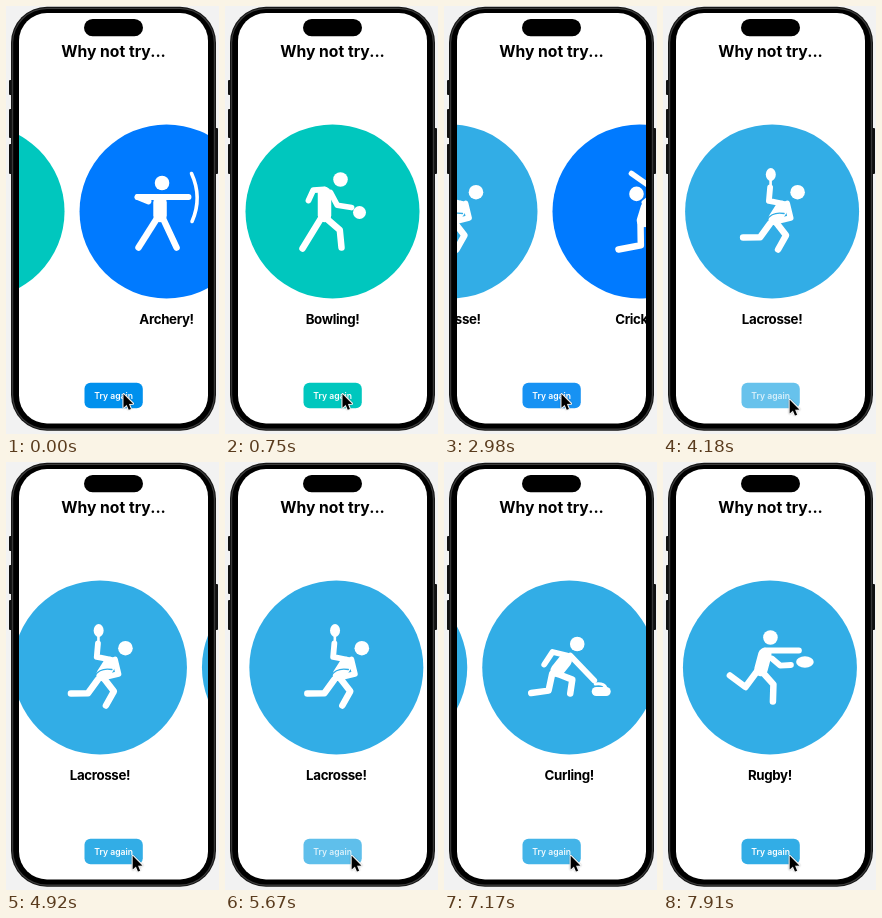
Animation of 213x428 px, one loop 8000 ms. Source, as an HTML page with a canvas:

```html
<!DOCTYPE html>
<html lang="en">
<head>
<meta charset="utf-8">
<title>Why not try...</title>
<style>
html, body { margin: 0; width: 100%; height: 100%; overflow: hidden; background: #f2f2f2; }
canvas { display: block; width: 100vw; height: 100vh; }
</style>
</head>
<body>
<canvas id="stage"></canvas>
<script>
const W = 213, H = 428, LOOP = 8000, TICK = 149.25, SLIDE = 1000;
const LEFT = 13, RIGHT = 202, SPAN = RIGHT - LEFT, MID = (LEFT + RIGHT) / 2;
const FONT = 'Inter, "Liberation Sans", sans-serif';
const BLUE = [0, 122, 255], MINT = [0, 199, 190], CYAN = [50, 173, 230];
const canvas = document.getElementById('stage');
const ctx = canvas.getContext('2d');

const rgb = c => `rgb(${c.map(Math.round).join(',')})`;
const mix = (a, b, k) => a.map((v, i) => v + (b[i] - v) * k);
const clamp = x => Math.min(1, Math.max(0, x));

// Ease in-out: cubic-bezier(.42, 0, .58, 1)
function ease(x) {
  if (x <= 0) return 0;
  if (x >= 1) return 1;
  let lo = 0, hi = 1, s = 0.5;
  for (let i = 0; i < 24; i++) {
    const u = 1 - s;
    if (1.26 * s * u * u + 1.74 * s * s * u + s * s * s < x) lo = s; else hi = s;
    s = (lo + hi) / 2;
  }
  return s * s * (3 - 2 * s);
}

function line(width, ...points) {
  ctx.lineWidth = width;
  ctx.beginPath();
  points.forEach(p => ctx.lineTo(...p));
  ctx.stroke();
}

// Two equal bones; bend pushes the joint sideways by a share of the reach.
function limb(width, [x0, y0], [x1, y1], bend = 0) {
  const joint = [(x0 + x1) / 2 - bend * (y1 - y0), (y0 + y1) / 2 + bend * (x1 - x0)];
  line(width, [x0, y0], joint, [x1, y1]);
}

function arc(width, [x0, y0], [cx, cy], [x1, y1]) {
  ctx.lineWidth = width;
  ctx.beginPath();
  ctx.moveTo(x0, y0);
  ctx.quadraticCurveTo(cx, cy, x1, y1);
  ctx.stroke();
}

function oval(x, y, rx, ry = rx) {
  ctx.beginPath();
  ctx.ellipse(x, y, rx, ry, 0, 0, 7);
  ctx.fill();
}

function box(x, y, w, h, r, fill) {
  ctx.beginPath();
  ctx.roundRect(x, y, w, h, r);
  ctx.fillStyle = fill;
  ctx.fill();
}

function text(str, x, y, size, weight, spacing, fill) {
  ctx.font = `${weight} ${size}px ${FONT}`;
  ctx.letterSpacing = spacing + 'px';
  ctx.textAlign = 'center';
  ctx.fillStyle = fill;
  ctx.fillText(str, x, y);
}

// Key points around the disc centre: [start, end, bend] per limb.
const sports = {
  Archery: {
    head: [-4.5, -28.5], torso: [[-6.5, -9], [-6.5, 4]],
    arms: [[[-29, -14.5], [22, -14.5]], [[-29, -14.5], [-18, -10]]],
    legs: [[[-9, 6], [-28, 36]], [[-4, 6], [10, 36]]],
    gear() { arc(3.6, [25, -38], [36, -14], [25.5, 10]); }
  },
  Bowling: {
    head: [8, -32], torso: [[-8, -18], [-8, 4]],
    arms: [[[-8, -22], [-24, -11], 0.3], [[-2, -19], [19, -4], 0.25]],
    legs: [[[-11, 6], [-30, 37]], [[-6, 7], [9, 36], -0.2]],
    gear() { oval(27, 1, 6.5); }
  },
  Cricket: {
    head: [-3, -17.6], torso: [[8, -4], [4, 9]],
    arms: [[[6, -5], [14, -23], 0.6], [[5, -9], [20, -20]]],
    legs: [[[1, 11], [-21, 38], -0.42], [[4, 11], [19, 38], -0.38]],
    gear() { line(5.6, [-8, -38], [12, -24]); }
  },
  Lacrosse: {
    head: [25.5, -19.3], torso: [[10, -4], [3, 7]],
    arms: [[[-2, -24], [10, -8], 0.45], [[15, -8], [4, 10], -0.5]],
    legs: [[[-2, 12], [-29, 26], -0.25], [[4, 11], [6, 38], -0.33]],
    gear(back) {
      oval(-1.3, -37, 5, 6.5);
      line(2.6, [-1.5, -32], [-1.5, -20]);
      ctx.strokeStyle = back;
      arc(1.3, [-5, 8], [0, 0], [12, 2]);
    }
  },
  Curling: {
    head: [8, -23.5], torso: [[-4, -7], [-12, 3]],
    arms: [[[1, -12], [25, 13]], [[-2, -12], [-25, -3], 0.35]],
    legs: [[[-10, 7], [1, 26], -0.4], [[-17, 6], [-38, 25.5], -0.35]],
    gear() {
      arc(3, [26, 16.5], [36, 15], [37, 22]);
      line(9, [27, 24], [37, 24]);
    }
  },
  Rugby: {
    head: [0.5, -30], torso: [[-5, -13], [-9, 2]],
    arms: [[[-5, -17], [29, -17]], [[2, -9], [21, -2.5], 0.2]],
    legs: [[[-13, 4], [-40, 8], -0.5], [[-8, 4], [3, 34], -0.2]],
    gear() { oval(35, -5.5, 8.8, 5.8); }
  }
};

const steps = [
  { at: -2000, name: 'Archery', color: BLUE },
  { at: -367, name: 'Bowling', color: MINT },
  { at: 1256, name: 'Cricket', color: BLUE },
  { at: 2505, name: 'Lacrosse', color: CYAN },
  { at: 4113, name: 'Lacrosse', color: CYAN },
  { at: 5570, name: 'Curling', color: CYAN },
  { at: 6950, name: 'Rugby', color: CYAN }
];

function athlete({ head, torso, arms, legs, gear }, back) {
  ctx.fillStyle = ctx.strokeStyle = '#fff';
  ctx.lineCap = ctx.lineJoin = 'round';
  oval(...head, 7.3);
  line(13.5, ...torso);
  arms.forEach(a => limb(5.8, ...a));
  legs.forEach(l => limb(6.5, ...l));
  gear(back);
}

function card({ name, color }, x) {
  const back = rgb(color);
  ctx.save();
  ctx.translate(x, 205.5);
  ctx.fillStyle = back;
  oval(0, 0, 87);
  athlete(sports[name], back);
  ctx.restore();
  text(name + '!', x, 317.8, 13.3, 700, -0.35, '#000');
}

function phone() {
  for (const [x, y, h] of [[3, 74, 15], [3, 103, 29], [3, 138, 30], [208, 122, 46]]) {
    box(x, y, 4, h, 1, '#111');
  }
  // Nested shells from the dark rim to the black bezel.
  ['#161616', '#3c3c3c', '#000'].forEach((fill, i) => {
    const inset = i * 1.1;
    box(5 + inset, 0.8 + inset, 205 - 2 * inset, 424 - 2 * inset, 36 - inset, fill);
  });
  screenPath();
  ctx.fillStyle = '#fff';
  ctx.fill();
}

function screenPath() {
  ctx.beginPath();
  ctx.roundRect(LEFT, 7, SPAN, 410.5, 28);
}

// Button dims while pressed, then fades back.
function dimAt(t) {
  const press = steps.findLast(s => t >= s.at - 115);
  return 0.29 * (1 - clamp((t - press.at - 40) / 250));
}

function button(t, color) {
  ctx.globalAlpha = 1 - dimAt(t);
  box(78.5, 376.7, 58.3, 25.6, 6, rgb(color));
  text('Try again', 107.6, 392.6, 8.6, 600, 0, '#fff');
  ctx.globalAlpha = 1;
}

// Arrow: a 45-degree wedge with a tail along its middle.
function arrow(color, grow) {
  const size = 13.2, side = size * Math.SQRT1_2, mid = Math.PI * 3 / 8;
  const along = r => [r * Math.cos(mid), r * Math.sin(mid)];
  ctx.fillStyle = ctx.strokeStyle = color;
  line(2.4 + grow, along(9), along(16.3));
  ctx.lineWidth = 0.3 + grow;
  ctx.beginPath();
  [[0, 0], [0, size], along(size * 0.8), [side, side]].forEach(p => ctx.lineTo(...p));
  ctx.closePath();
  ctx.fill();
  ctx.stroke();
}

function cursor(t) {
  const k = ease((t - 3560) / 480);
  ctx.save();
  ctx.translate(117.6 + 9.2 * k, 388.3 + 5.8 * k);
  ctx.lineJoin = 'round';
  ctx.shadowColor = 'rgba(0,0,0,.3)';
  ctx.shadowBlur = 1.5;
  arrow('#fff', 2);
  ctx.shadowColor = 'transparent';
  arrow('#000', 0);
  ctx.restore();
}

function draw(t) {
  ctx.fillStyle = '#f2f2f2';
  ctx.fillRect(0, 0, W, H);
  phone();

  const i = Math.max(1, steps.findLastIndex(s => t >= s.at));
  const from = steps[i - 1], to = steps[i];
  const k = ease((t - to.at) / SLIDE);

  ctx.save();
  screenPath();
  ctx.clip();
  text('Why not try...', MID, 51, 15.7, 700, 0, '#000');
  card(from, MID + SPAN * k);
  card(to, MID + SPAN * (k - 1));
  button(t, mix(from.color, to.color, k));
  ctx.restore();

  box(78, 13, 59, 17.3, 8.65, '#000');
  cursor(t);
}

function resize() {
  const ratio = window.devicePixelRatio || 1;
  canvas.width = Math.round(innerWidth * ratio);
  canvas.height = Math.round(innerHeight * ratio);
}

const start = performance.now();
function frame() {
  const t = (performance.now() - start) % LOOP;
  // The picture refreshes in coarse ticks.
  const shown = Math.min(53, Math.floor((t + 12) / TICK)) * TICK;
  ctx.setTransform(canvas.width / W, 0, 0, canvas.height / H, 0, 0);
  draw(shown);
  requestAnimationFrame(frame);
}

addEventListener('resize', resize);
resize();
frame();
</script>
</body>
</html>
```
